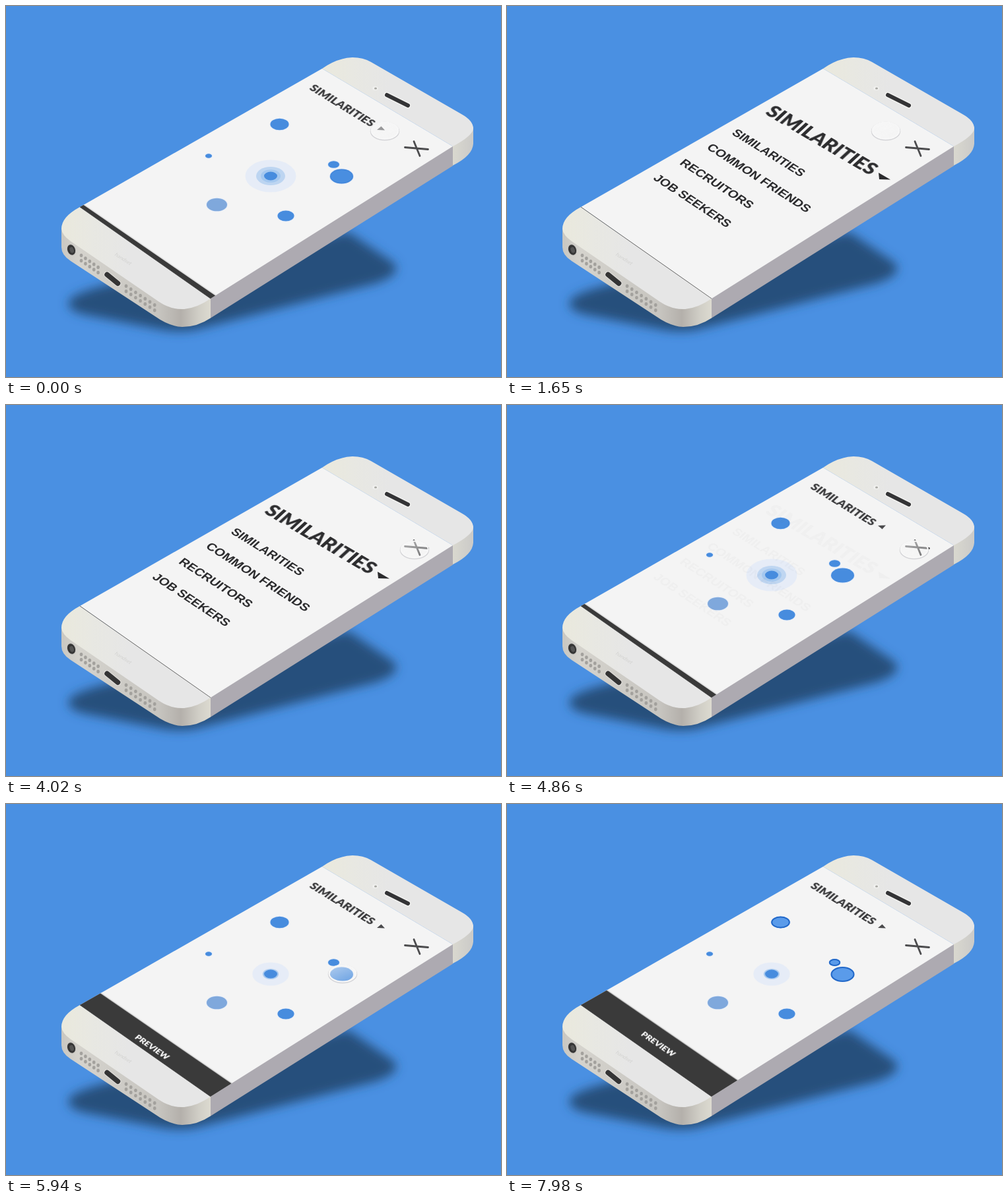
Write an HTML page that moves like this. It is 750 px wide and 563 px high and loops after 8 s.

```html
<!DOCTYPE html>
<html lang="en">
<head>
<meta charset="utf-8">
<title>Phone menu</title>
<style>
  html, body { margin: 0; width: 100%; height: 100%; overflow: hidden; background: #4a90e2; }
  svg { display: block; width: 100vw; height: 100vh; }
  .title { font: 900 39.5px Lato, sans-serif; fill: #2d2d2f; }
  .head { font: 900 23.2px Lato, sans-serif; fill: #363638; }
  .item { font: bold 25.3px "Liberation Sans", Arial, sans-serif; fill: #2b2b2d; }
  .label { font: 900 16.8px Lato, sans-serif; fill: #fff; }
  .tiny { font: 11px Lato, sans-serif; fill: #d2d2d0; }
  .dots ellipse { fill: #478cde; stroke: #e2ebf8; stroke-width: 2; paint-order: stroke; }
  .dots .pale { fill: #7fa8dc; }
  .picked ellipse { fill: #5a9bea; stroke: #2268c8; stroke-width: 2; }

  .anim { animation: 8s linear infinite; }
  .main { animation-name: main; }
  .big { animation-name: big; }
  .items { animation-name: items; }
  .bar { animation-name: bar; }
  .flip { animation-name: flip; transform-box: fill-box; transform-origin: center; }
  .ring, .mid, .halo { transform-box: fill-box; transform-origin: center; }
  .ring { --min: .72; animation-name: pulse; }
  .mid { --min: .58; animation-name: pulse; }
  .halo { --min: .8; animation-name: pulse; }
  .glow { animation-name: glow; }
  .p1 { animation-name: pick1; }
  .p2 { animation-name: pick2; }
  .p3 { animation-name: pick3; }
  .touch { animation-name: touch; }

  @keyframes main { 0%, 2.5% { opacity: 1 } 10%, 52% { opacity: 0 } 58.7%, 100% { opacity: 1 } }
  @keyframes big { 0%, 3% { opacity: 0 } 10.1%, 51.9% { opacity: 1 } 61%, 100% { opacity: 0 } }
  @keyframes items { 0%, 6% { opacity: 0 } 16.1%, 51.9% { opacity: 1 } 61%, 100% { opacity: 0 } }
  @keyframes bar {
    0%, 2.5% { transform: translate(-33px, 19.5px) }
    10%, 52.5% { transform: translate(-42px, 25px) }
    58.7% { transform: translate(-33px, 19.5px) }
    72.25% { transform: translate(-33px, 19.5px); animation-timing-function: cubic-bezier(.33, 1, .68, 1) }
    77.5%, 100% { transform: none }
  }
  @keyframes flip {
    0%, 10% { transform: none }
    10.1%, 61.5% { transform: scaleY(-1) }
    66%, 100% { transform: none }
  }
  @keyframes pulse {
    0% { transform: none; animation-timing-function: ease-in }
    10%, 48.75% { transform: scale(var(--min)); animation-timing-function: ease-out }
    61.5% { transform: none; animation-timing-function: ease-in }
    74.25% { transform: scale(var(--min)); animation-timing-function: ease-out }
    87% { transform: none; animation-timing-function: ease-in }
    99.75%, 100% { transform: scale(var(--min)) }
  }
  @keyframes glow {
    0% { opacity: 1 } 10%, 48.75% { opacity: .1 }
    61.5% { opacity: 1 } 74.25% { opacity: .1 }
    82%, 89% { opacity: 1 } 99.75%, 100% { opacity: .1 }
  }
  @keyframes pick1 { 0% { opacity: .15 } 6%, 74.5% { opacity: 0 } 78%, 100% { opacity: 1 } }
  @keyframes pick2 { 0%, 82.7% { opacity: 0 } 86.2%, 100% { opacity: 1 } }
  @keyframes pick3 { 0%, 91.9% { opacity: 0 } 95.6%, 100% { opacity: 1 } }
  @keyframes touch {
    0%, 24% { transform: translate(574px, 189px); opacity: 1 }
    33.75% { transform: translate(600px, 206px); opacity: 0 }
    48.75% { transform: translate(612px, 214px); opacity: 0 }
    50% { transform: translate(619px, 219px); opacity: 1 }
    60.75% { transform: translate(617px, 219px); opacity: 1 }
    65% { transform: translate(617px, 219px); opacity: 1; animation-timing-function: ease-in-out }
    72.5%, 78% { transform: translate(510px, 257px); opacity: 1; animation-timing-function: ease-in-out }
    81.5%, 85.6% { transform: translate(497px, 240px); opacity: 1; animation-timing-function: ease-in-out }
    90.6%, 95% { transform: translate(414px, 179px); opacity: 1 }
    98.5%, 100% { transform: translate(414px, 179px); opacity: 0 }
  }
</style>
</head>
<body>
<svg viewBox="0 0 750 563" preserveAspectRatio="none">
  <defs>
    <filter id="soft" x="-10%" y="-30%" width="120%" height="160%"><feGaussianBlur stdDeviation="8"/></filter>
    <clipPath id="screen"><path d="M112 305L479 95L677 213L310 444Z"/></clipPath>
    <linearGradient id="edge">
      <stop offset="0" stop-color="#c9c7c1"/><stop offset=".12" stop-color="#d5d3cd"/>
      <stop offset=".65" stop-color="#c7c5c0"/><stop offset=".8" stop-color="#b4b0ab"/>
      <stop offset=".92" stop-color="#d0cec6"/><stop offset="1" stop-color="#dcdad0"/>
    </linearGradient>
    <linearGradient id="cap">
      <stop offset="0" stop-color="#eae9dd"/><stop offset=".2" stop-color="#e8e8e2"/>
      <stop offset=".45" stop-color="#e6e6e6"/>
    </linearGradient>
    <linearGradient id="corner">
      <stop offset="0" stop-color="#d9d8cf"/><stop offset="1" stop-color="#cbcac8"/>
    </linearGradient>
    <linearGradient id="glass" x1="0" y1="0" x2=".7" y2="1">
      <stop offset="0" stop-color="#f8f8f8" stop-opacity=".6"/><stop offset="1" stop-color="#f8f8f8" stop-opacity=".25"/>
    </linearGradient>
  </defs>

  <rect width="750" height="563" fill="#4a90e2"/>
  <path d="M97 453Q92 441 150 426L518 345L580 387Q606 403 560 419L300 486Q270 495 240 490L122 467Q98 462 97 453Z"
        fill="#264f7c" stroke="#264f7c" stroke-width="4" filter="url(#soft)"/>

  <!-- phone body -->
  <path d="M84 338V366Q84 378 98 387L226 471Q247 486 267 487Q290 487 310 473.500V440L200 350Z" fill="url(#edge)"/>
  <path d="M310 443L677 212V242.500L310 473.500Z" fill="#adaab1"/>
  <path d="M677 212L708 183V209Q707 227 677 242Z" fill="url(#corner)"/>
  <path d="M112 305Q84 320 84 338Q85 348 98 357L232 449Q250 461 270 460Q290 458 310 444Z" fill="url(#cap)"/>
  <path d="M479 95Q501 79 525 78Q541 78 553 85L690 164Q708 174 708 186Q707 197 677 213Z" fill="url(#cap)"/>
  <path d="M112 305L479 95L677 213L310 444Z" fill="#f4f4f4"/>
  <path d="M112 305L310 444" stroke="#666" stroke-width="1"/>

  <g fill="none" stroke-linecap="round">
    <path d="M577 135L609 151" stroke="#f3f3f1" stroke-width="9"/>
    <path d="M577 135L609 151" stroke="#343436" stroke-width="6"/>
    <path d="M153 407.500L169.500 421" stroke="#e0deda" stroke-width="10"/>
    <path d="M153 407.500L169.500 421" stroke="#343434" stroke-width="7.500"/>
  </g>
  <ellipse cx="559.500" cy="125" rx="4.500" ry="3" fill="#f0f0ee"/>
  <ellipse cx="560" cy="125" rx="2" ry="1.500" fill="#a9a9a4"/>
  <g transform="rotate(-20 99 370)">
    <ellipse cx="99" cy="370" rx="6.800" ry="9" fill="#c2c0bc"/>
    <ellipse cx="99" cy="370" rx="5.800" ry="8" fill="#353535"/>
    <ellipse cx="99.500" cy="370.500" rx="3" ry="4.500" fill="#555"/>
  </g>
  <g id="holes" fill="#a3a19d"></g>
  <text class="tiny" transform="matrix(.62 .4 -.52 .48 164 378)">handset</text>

  <!-- screen -->
  <g clip-path="url(#screen)">
    <g class="anim main">
      <text class="head" transform="matrix(.635 .39 -.52 .48 458.500 126)">SIMILARITIES</text>
      <path class="anim flip" d="M562 188L568.500 182.500L574 188.500Z" fill="#4a4a4c"/>
      <g fill="#e6ecf7">
        <ellipse class="anim ring" cx="401" cy="258" rx="38.500" ry="24.500"/>
      </g>
      <g class="anim glow">
        <ellipse class="anim mid" cx="401" cy="258" rx="22" ry="14" fill="#bdd5f1"/>
      </g>
      <ellipse class="anim halo" cx="401" cy="258" rx="15" ry="9.800" fill="#a5c8ef"/>
      <ellipse cx="401" cy="258" rx="10" ry="6.500" fill="#478cde"/>
      <g class="dots">
        <ellipse cx="414.500" cy="179.500" rx="14" ry="8.800"/>
        <ellipse cx="307" cy="227.500" rx="5" ry="3.300"/>
        <ellipse cx="496.500" cy="240.500" rx="8.500" ry="5.300"/>
        <ellipse cx="508.500" cy="258.500" rx="17.500" ry="11"/>
        <ellipse class="pale" cx="319.500" cy="301.500" rx="15.500" ry="9.800"/>
        <ellipse cx="424" cy="318.500" rx="12.500" ry="8"/>
      </g>
      <g class="picked">
        <ellipse class="anim p2" cx="496.500" cy="240.500" rx="7.700" ry="4.500"/>
        <ellipse class="anim p1" cx="508.500" cy="258.500" rx="17" ry="10.500"/>
        <ellipse class="anim p3" cx="414.500" cy="179.500" rx="13.300" ry="8"/>
      </g>
    </g>

    <text class="title anim big" transform="matrix(.635 .373 -.52 .48 390 163)">SIMILARITIES</text>
    <path class="anim big" d="M563 253L581 263.500L564 263Z" fill="#2b2b2d"/>
    <g class="item anim items">
      <text transform="matrix(.63 .392 -.52 .48 339.500 194)">SIMILARITIES</text>
      <text transform="matrix(.645 .415 -.52 .48 301.500 216)">COMMON FRIENDS</text>
      <text transform="matrix(.638 .412 -.52 .48 260.500 239.500)">RECRUITORS</text>
      <text transform="matrix(.625 .413 -.52 .48 220.500 262.500)">JOB SEEKERS</text>
    </g>

    <path d="M604.500 214.500L639.500 217.500M618 205.500L627 227.500" stroke="#4c4c4e" stroke-width="2.800" stroke-linecap="round"/>

    <g class="anim bar">
      <path d="M131 269L369 433L310 470L72 306Z" fill="#3a3a3a" stroke="#dcdcdc" stroke-width="3" paint-order="stroke"/>
      <text class="label" transform="matrix(.635 .44 -.52 .48 202 350.500)">PREVIEW</text>
    </g>
  </g>

  <!-- touch point -->
  <g class="anim touch">
    <ellipse cy="1" rx="21.500" ry="13.500" fill="none" stroke="#c9c9cc" stroke-width="1.500" opacity=".75"/>
    <ellipse rx="20.500" ry="12.500" fill="none" stroke="#f7f7f7" stroke-width="2"/>
    <ellipse rx="20" ry="12" fill="url(#glass)"/>
  </g>
</svg>
<script>
  // speaker holes: two rows per group
  const holes = document.getElementById('holes');
  const addHoles = (x, y, dx, dy, count) => {
    for (let i = 0; i < count * 2; i++) {
      const c = document.createElementNS('http://www.w3.org/2000/svg', 'ellipse');
      const n = i >> 1;
      c.setAttribute('cx', x + n * dx);
      c.setAttribute('cy', y + n * dy + (i % 2) * 8);
      c.setAttribute('rx', 2.3);
      c.setAttribute('ry', 2.7);
      holes.append(c);
    }
  };
  addHoles(114, 378.5, 6.4, 4.5, 5);
  addHoles(182, 425, 7.2, 4.8, 7);
</script>
</body>
</html>
```
